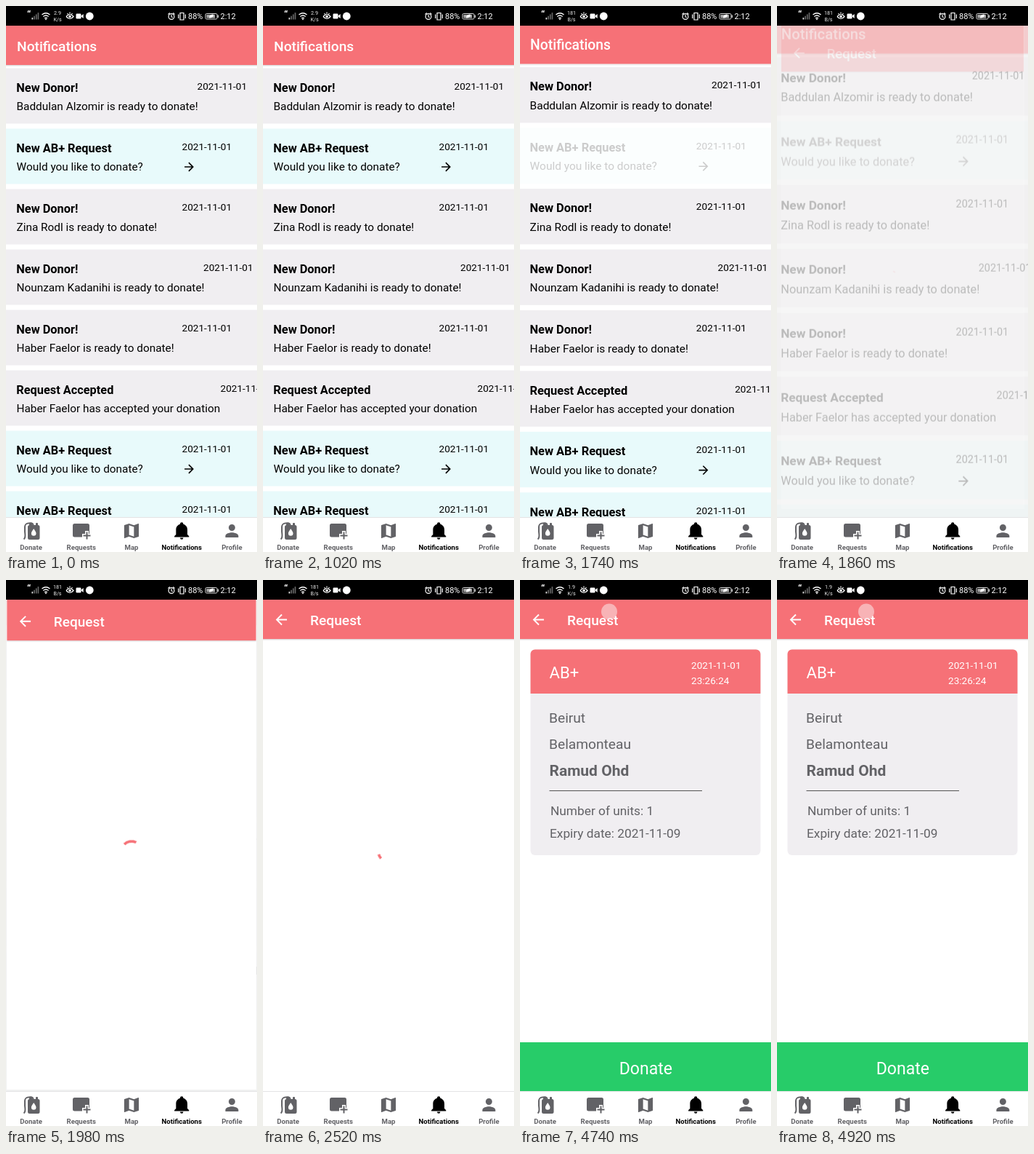
An HTML page for the animation above (4.98 s loop, 346 by 750 pixels).

```html
<!DOCTYPE html>
<html lang="en">
<head>
<meta charset="utf-8">
<title>Donation requests</title>
<style>
  @property --p { syntax: '<number>'; inherits: true; initial-value: 0; }

  html, body { margin: 0; width: 100%; height: 100%; overflow: hidden; background: #fff; }
  svg { display: block; }
  text { font-family: Roboto, sans-serif; white-space: pre; }

  #stage { --loop: 4980ms; animation: push var(--loop) infinite; }
  .screen { transform-origin: 173px 351px; }
  #list {
    transform: scale(calc(1 + .075 * var(--p)));
    opacity: clamp(0, calc(1 - (var(--p) - .2075) / .7925), 1);
  }
  #detail {
    transform: scale(calc(.85 + .15 * var(--p)));
    opacity: clamp(0, calc((var(--p) - .75) / .125), 1);
  }
  .tapped { animation: press var(--loop) infinite; }
  #reel { animation: speed var(--loop) step-end infinite; }
  #content { animation: show var(--loop) step-end infinite; }
  #wait { animation: hide var(--loop) step-end infinite; }
  #arc {
    fill: none; stroke: #f67177; stroke-width: 3.6;
    transform-origin: 173px 373px;
    animation: spin var(--loop) infinite;
  }
  #touch { animation: touch var(--loop) step-end infinite; }

  /* screen transition, 1732 to 2212 ms */
  @keyframes push {
    0% { --p: 0; }
    34.779% { --p: 0; animation-timing-function: cubic-bezier(.20833, .82, .25, 1); }
    44.418%, 100% { --p: 1; }
  }
  @keyframes press {
    0%, 31.325% { opacity: 1; animation-timing-function: ease-in-out; }
    34.337%, 34.839% { opacity: .2; animation-timing-function: ease-in-out; }
    39.859%, 100% { opacity: 1; }
  }
  @keyframes speed {
    0% { transform: none; }
    28.916% { transform: translateY(-40px); }
    95.181%, 100% { transform: translateY(-80px); }
  }
  @keyframes show { 0% { visibility: hidden; } 51.807%, 100% { visibility: visible; } }
  @keyframes hide { 0% { visibility: visible; } 51.807%, 100% { visibility: hidden; } }
  @keyframes touch { 0% { visibility: hidden; } 95.181%, 100% { visibility: visible; } }
  @keyframes spin {
    0%, 37.349% { transform: rotate(-150deg); stroke-dasharray: 4 360; animation-timing-function: ease-in-out; }
    43.976% { transform: rotate(-100deg); stroke-dasharray: 250 360; animation-timing-function: ease-in-out; }
    50.602% { transform: rotate(137deg); stroke-dasharray: 27 360; animation-timing-function: linear; }
    51.807%, 100% { transform: rotate(160deg); stroke-dasharray: 8 360; }
  }
</style>
</head>
<body>
<svg id="stage" width="346" height="750" viewBox="0 0 346 750"></svg>
<script>
const PINK = '#f67177', CARD = '#f0eef1', CYAN = '#e8fafb', GREY = '#626266';

const text = (x, y, size, str, fill = '#000', weight = 400, anchor = 'start') =>
  `<text x="${x}" y="${y}" font-size="${size}" fill="${fill}" font-weight="${weight}" text-anchor="${anchor}">${str}</text>`;
const rect = (x, y, w, h, fill, rx = 0) =>
  `<rect x="${x}" y="${y}" width="${w}" height="${h}" rx="${rx}" fill="${fill}"/>`;
// 24-unit icon centred on a point
const icon = (x, y, scale, d, fill) =>
  `<path transform="translate(${x} ${y}) scale(${scale}) translate(-12 -12)" d="${d}" fill="${fill}"/>`;
const line = (d, width, color = '#fff') =>
  `<path d="${d}" fill="none" stroke="${color}" stroke-width="${width}"/>`;

const ARROW = 'M12 4l-1.41 1.41L16.17 11H4v2h12.17l-5.58 5.59L12 20l8-8z';
const BACK = 'M20 11H7.83l5.59-5.59L12 4l-8 8 8 8 1.41-1.41L7.83 13H20z';
const MAP = 'M20.5 3l-.16.03L15 5.1 9 3 3.36 4.9c-.21.07-.36.25-.36.48V20.5c0 .28.22.5.5.5l.16-.03L9 18.9l6 2.1 5.64-1.9c.21-.07.36-.25.36-.48V3.5c0-.28-.22-.5-.5-.5zM15 19l-6-2.11V5l6 2.11z';
const BELL = 'M21 19v1H3v-1l2-2v-6c0-3.1 2.03-5.83 5-6.71V4a2 2 0 0 1 4 0v.29c2.97.88 5 3.61 5 6.71v6zM14 21a2 2 0 0 1-4 0z';
const PERSON = 'M12 12a4 4 0 1 0 0-8 4 4 0 0 0 0 8zm0 2c-2.67 0-8 1.34-8 4v2h16v-2c0-2.66-5.33-4-8-4z';

const header = (x, title) =>
  rect(0, 0, 346, 702, '#fff') + rect(0, 81, 346, 1, '#dfdcdd') + rect(0, 82, 346, 1, '#f0eeef') +
  rect(0, 0, 346, 81, PINK) + text(x, 62, 19.2, title, '#fff', 500);

const donor = (name, x = 243) => ['New Donor!', `${name} is ready to donate!`, x];
const request = ['New AB+ Request', 'Would you like to donate?', 243, true];
const rows = [
  donor('Baddulan Alzomir', 264),
  request,
  donor('Zina Rodl'),
  donor('Nounzam Kadanihi', 272.5),
  donor('Haber Faelor'),
  ['Request Accepted', 'Haber Faelor has accepted your donation', 296],
  request,
  request,
];

const row = ([title, body, dateX, open], i) => {
  const y = 86 + 83 * i;
  return `<g${i === 1 ? ' class="tapped"' : ''}>` +
    rect(0, y - .5, 346, 76, open ? CYAN : CARD) +
    text(14.3, y + 31.7, 16.34, title, '#000', 700) +
    text(14.5, y + 57.2, 15.38, body) +
    text(dateX - .5, y + 28.7, 13.6, '2021-11-01') +
    (open ? icon(252.5, y + 52, .8, ARROW, '#000') : '') + '</g>';
};

const list = `<g id="list" class="screen">${header(15, 'Notifications')}${rows.map(row).join('')}</g>`;

const content = '<g id="content">' +
  rect(14.5, 95.5, 317, 282.5, CARD, 6) +
  `<path d="M14.5 156V101.500a6 6 0 0 1 6-6h305a6 6 0 0 1 6 6V156z" fill="${PINK}"/>` +
  text(40.5, 134.5, 22.1, 'AB+', '#fff') +
  text(236, 121.7, 13.6, '2021-11-01', '#fff') +
  text(236, 142.7, 13.6, '23:26:24', '#fff') +
  text(40, 196, 19.2, 'Beirut', GREY) +
  text(40, 231.700, 19.2, 'Belamonteau', GREY) +
  text(40.5, 269, 21, 'Ramud Ohd', GREY, 700) +
  rect(40.5, 289, 210.5, 1, '#555') +
  text(42, 323, 17.3, 'Number of units: 1', GREY) +
  text(41, 354.300, 17.3, 'Expiry date: 2021-11-09', GREY) +
  rect(0, 635, 346, 68, '#27cc69') +
  text(173.3, 679, 23.07, 'Donate', '#fff', 400, 'middle') + '</g>';

const detail = '<g id="detail" class="screen">' + header(65, 'Request') +
  icon(25.3, 54.5, .96, BACK, '#fff') +
  '<g id="wait"><circle id="arc" cx="173" cy="373" r="14" pathLength="360"/></g>' + content + '</g>';

const bag = line('M24.500 732.500c3-2 2-6 1.500-10v-7a5 5 0 0 1 5-5h3.500a3 3 0 0 1 3 3', 2, GREY) +
  rect(30, 713, 16.5, 20, GREY, 2.5) + rect(32, 709.5, 4, 5, GREY, 1) + rect(41, 710, 3, 4, GREY, 1) +
  '<path d="M38.200 718c2 3 3.300 4.500 3.300 6.500a3.300 3.300 0 0 1-6.600 0c0-2 1.300-3.500 3.300-6.500z" fill="#fff"/>';
const add = rect(92, 711, 23, 18.5, GREY, 2.5) +
  line('M111.500 721v13M105 727.500h13', 5, '#fff') + line('M111.500 722.500v10M106.500 727.500h10', 2, GREY);

const tabs = rect(0, 702, 346, 48, '#fff') + rect(0, 702, 346, 1, '#e3e3e4') +
  bag + add + icon(173, 721, 1.12, MAP, GREY) + icon(242.2, 720.500, 1.12, BELL, '#000') +
  icon(311.4, 721, 1.12, PERSON, GREY) +
  ['Donate', 'Requests', 'Map', 'Notifications', 'Profile'].map((label, i) =>
    text(34.6 + 69.2 * i, 747, 9.6, label, i === 3 ? '#000' : GREY, 700, 'middle')).join('');

const speeds = [['2.9', 'K/s'], ['181', 'B/s'], ['1.9', 'K/s']].map(([n, unit], i) =>
  text(11, 8 + 40 * i, 7.2, n, '#e8e8e8', 400, 'middle') +
  text(11, 17 + 40 * i, 7.2, unit, '#e8e8e8', 400, 'middle')).join('');

const bars = [0, 1, 2, 3].map(i =>
  rect(35.5 + 2.7 * i, 16 - 2.3 * i, 1.7, 2.5 + 2.3 * i, i ? '#666' : '#ddd')).join('');

const status = rect(0, 0, 346, 27, '#000') +
  text(29, 16, 13, '“', '#fff', 700) + bars +
  line('M49.500 12q5.500-4.500 11 0M51.300 14.500q3.700-3 7.400 0M53 16.800q2-1.500 4 0', 1.3) +
  '<circle cx="55" cy="18.300" r="1" fill="#fff"/>' +
  `<svg x="60" y="4" width="22" height="20"><g id="reel">${speeds}</g></svg>` +
  line('M83 14.500q5-6 10 0q-5 6-10 0M84.500 10l1.200 1.500M88 8.500v2M91.500 10l-1.200 1.500', 1.2) +
  '<circle cx="88" cy="14.500" r="1.800" fill="#fff"/>' +
  rect(96.5, 10.5, 7, 7, '#fff', 1.3) + '<path d="M103.500 13.500l3.200-2.500v6l-3.200-2.500z" fill="#fff"/>' +
  '<circle cx="115.300" cy="14" r="5.400" fill="#fff"/>' +
  '<circle cx="228" cy="14.500" r="3.900" fill="none" stroke="#fff" stroke-width="1.200"/>' +
  line('M228 12v2.700l1.800 1M223.500 11.500l2.300-2M232.500 11.500l-2.300-2', 1.1) +
  line('M240 9.500h5v9.500h-5zM237.700 11.500v5.500M247.300 11.500v5.500', 1.2) +
  text(251, 18, 11, '88%', '#fff') +
  '<rect x="275" y="10.500" width="16" height="7.500" rx="1.500" fill="none" stroke="#ddd"/>' +
  rect(276.5, 12, 11.5, 4.5, '#aaa') + rect(291.7, 12.5, 1.3, 3.5, '#ddd') +
  '<path d="M280 16.500q0-5 6-5q0 5-6 5z" fill="#fff"/>' +
  text(295.5, 18, 11, '2:12', '#fff');

const touch = '<circle id="touch" cx="123" cy="43.500" r="11" fill="#f8dcdd" fill-opacity=".62"/>';

document.getElementById('stage').innerHTML =
  rect(0, 0, 346, 750, '#f2f2f2') + list + detail + tabs + status + touch;
</script>
</body>
</html>
```
